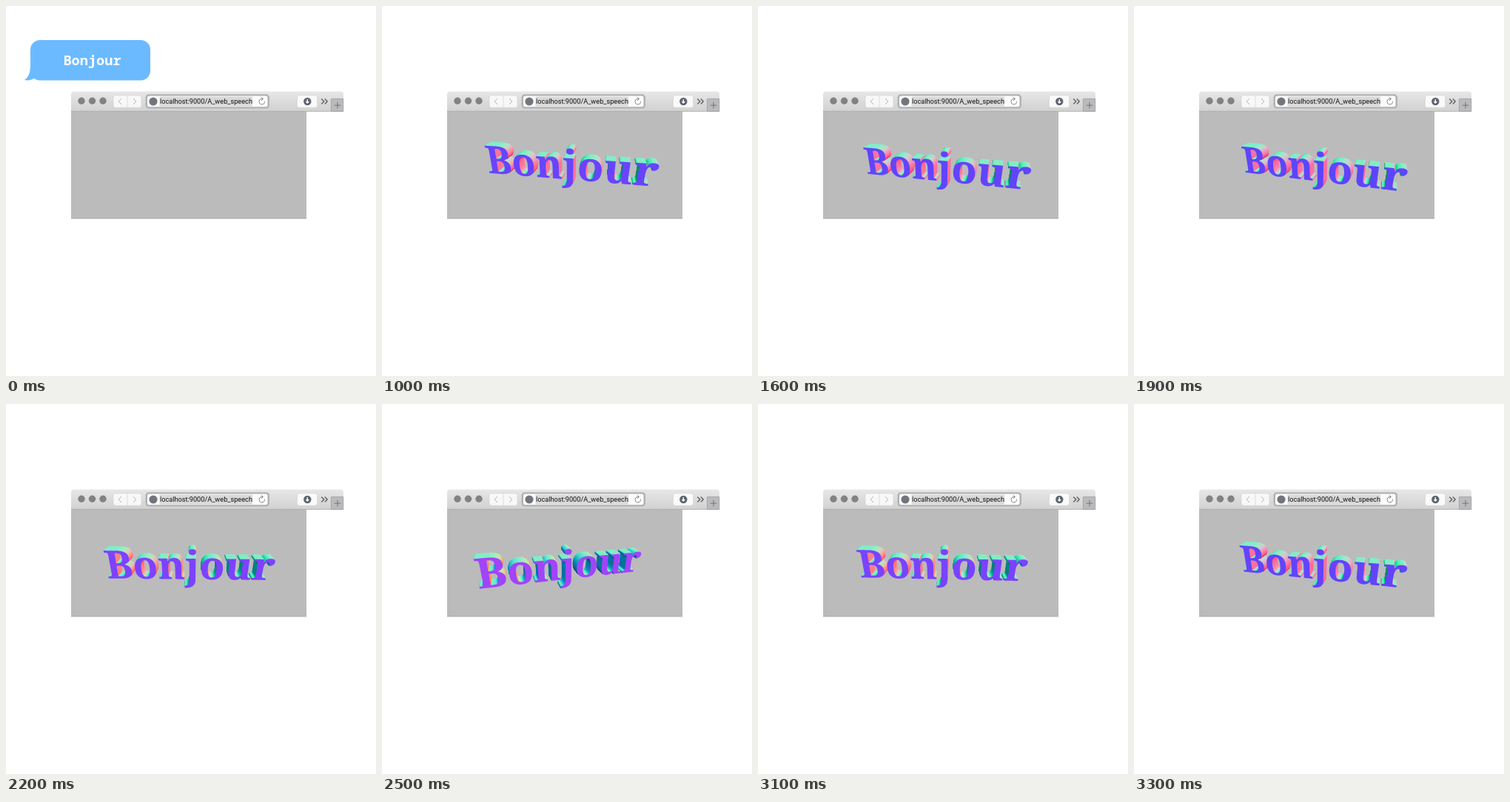
Write an HTML page with a canvas that moves like this. It is 500 px wide and 500 px high and loops after 3400 ms.

```html
<!DOCTYPE html>
<html lang="fr">
<head>
<meta charset="utf-8">
<title>Bonjour</title>
<style>
html, body { margin: 0; width: 100%; height: 100%; overflow: hidden; background: #fff; }
canvas { display: block; width: 500px; height: 500px; }
</style>
</head>
<body>
<canvas id="stage"></canvas>
<script>
const LOOP = 3400, STEP = 100, SPEAK = 1000;
const canvas = document.getElementById('stage');
const ctx = canvas.getContext('2d');
const dpr = window.devicePixelRatio || 1;
canvas.width = canvas.height = 500 * dpr;

// --- 2D helpers ---
function box(x, y, w, h, r, fill, line) {
  ctx.beginPath();
  ctx.roundRect(x, y, w, h, r);
  if (fill) { ctx.fillStyle = fill; ctx.fill(); }
  if (line) { ctx.strokeStyle = line; ctx.stroke(); }
}

function disc(x, y, r, fill) {
  ctx.beginPath();
  ctx.arc(x, y, r, 0, Math.PI * 2);
  ctx.fillStyle = fill;
  ctx.fill();
}

function line(color, width, ...pts) {
  ctx.beginPath();
  for (let i = 0; i < pts.length; i += 2) ctx.lineTo(pts[i], pts[i + 1]);
  ctx.strokeStyle = color;
  ctx.lineWidth = width;
  ctx.stroke();
}

function drawBubble() {
  const blue = '#6bbaff';
  box(33, 46, 162, 54.5, 13, blue);
  ctx.beginPath();
  ctx.moveTo(33, 72);
  ctx.bezierCurveTo(33.5, 88, 32, 95, 25, 100);
  ctx.bezierCurveTo(30, 101, 35, 100, 39, 97);
  ctx.lineTo(48, 90);
  ctx.lineTo(48, 72);
  ctx.fill();
  ctx.fillStyle = '#fff';
  ctx.font = 'bold 18.6px "Noto Sans Mono", monospace';
  ctx.textAlign = 'center';
  ctx.fillText('Bonjour', 116.5, 79.5);
  ctx.textAlign = 'left';
}

function drawBrowser() {
  box(88, 142, 318, 145, 0, '#bbbbbb');
  line('#a2a2a2', 1, 88, 287, 406, 287);

  const bar = ctx.createLinearGradient(0, 116, 0, 142);
  bar.addColorStop(0, '#e6e6e6');
  bar.addColorStop(1, '#d2d2d2');
  box(88, 115.5, 368, 26.5, [4, 4, 0, 0], bar);
  line('#b0b0b0', 1, 88, 142.3, 456, 142.3);

  for (const x of [102, 116.5, 131]) disc(x, 128.3, 4.7, '#828282');

  // navigation
  ctx.lineWidth = 0.6;
  box(145, 120.8, 38, 16.4, 3, '#f8f8f8', '#cfcfcf');
  line('#d4d4d4', 0.8, 164, 121, 164, 137);
  line('#b2b2b2', 1, 156, 125, 152.2, 129, 156, 133);
  line('#b2b2b2', 1, 172, 125, 175.8, 129, 172, 133);

  // address field
  box(188.5, 119.3, 167.5, 19.2, 4.5, '#b2b2b2');
  box(191, 121.6, 162.5, 14.6, 2.5, '#fcfcfc');
  disc(199, 129, 5.6, '#71767c');
  box(207.5, 122.5, 125.5, 13, 0, '#d9d9d9');
  ctx.fillStyle = '#111';
  ctx.font = '9.2px Roboto, sans-serif';
  ctx.fillText('localhost:9000/A_web_speech', 208, 132.3);
  ctx.beginPath();
  ctx.arc(345.8, 129.2, 3.7, -0.1, 5);
  ctx.strokeStyle = '#777';
  ctx.lineWidth = 0.9;
  ctx.stroke();
  line('#777', 0.9, 345, 123.4, 347.5, 125.6, 345, 127.8);

  // downloads, overflow and new tab
  ctx.lineWidth = 0.6;
  box(393.3, 120.8, 27.4, 16.4, 3, '#fafafa', '#cfcfcf');
  disc(407.3, 129, 5.2, '#5c6470');
  line('#fff', 1.4, 407.3, 126, 407.3, 130);
  ctx.beginPath();
  ctx.moveTo(404.6, 129);
  ctx.lineTo(410, 129);
  ctx.lineTo(407.3, 132.2);
  ctx.fillStyle = '#fff';
  ctx.fill();
  for (const x of [426.3, 430.8]) line('#555', 1.2, x, 125.5, x + 3.5, 129, x, 132.5);
  ctx.lineWidth = 0.8;
  box(439.4, 125.4, 16.4, 17, 0, '#bababd', '#a0a0a2');
  line('#6c6c6c', 0.9, 443.8, 134.2, 452.2, 134.2);
  line('#6c6c6c', 0.9, 448, 130, 448, 138.4);
}

// --- letter outlines, traced from rendered text; y points up from the baseline ---
function traceText(text, halfWidth) {
  const w = 640, h = 190, base = 130;
  const off = document.createElement('canvas');
  off.width = w;
  off.height = h;
  const g = off.getContext('2d', { willReadFrequently: true });
  g.font = 'bold 120px "Noto Serif", serif';
  g.fillText(text, 20, base);
  const data = g.getImageData(0, 0, w, h).data;
  const alpha = (x, y) => data[(y * w + x) * 4 + 3];
  const next = new Map(), pts = new Map();
  const corners = [[0, 0], [1, 0], [1, 1], [0, 1]];
  let minX = w, maxX = 0;

  for (let y = 0; y < h - 1; y++) for (let x = 0; x < w - 1; x++) {
    const cuts = [];
    for (let i = 0; i < 4; i++) {
      const [ax, ay] = corners[i], [bx, by] = corners[(i + 1) % 4];
      const a = alpha(x + ax, y + ay), b = alpha(x + bx, y + by);
      if (a > 127 === b > 127) continue;
      const u = (127.5 - a) / (b - a);
      const px = x + ax + (bx - ax) * u, py = y + ay + (by - ay) * u;
      const key = 2 * ((y + Math.min(ay, by)) * w + x + Math.min(ax, bx)) + (ax === bx ? 1 : 0);
      pts.set(key, [px, py]);
      minX = Math.min(minX, px);
      maxX = Math.max(maxX, px);
      cuts.push({ key, exit: a > 127 });
    }
    cuts.forEach((c, i) => {
      if (c.exit) next.set(c.key, cuts[(i + 1) % cuts.length].key);
    });
  }

  const k = 2 * halfWidth / (maxX - minX), mid = (minX + maxX) / 2;
  const loops = [];
  while (next.size) {
    const loop = [];
    let key = next.keys().next().value;
    while (next.has(key)) {
      const [x, y] = pts.get(key), to = next.get(key);
      loop.push({ x: (x - mid) * k, y: (base - y) * k });
      next.delete(key);
      key = to;
    }
    const n = loop.length;
    loop.forEach((p, i) => {
      const a = loop[(i + n - 1) % n], b = loop[(i + 2) % n];
      const dx = b.x - a.x, dy = b.y - a.y, len = Math.hypot(dx, dy) || 1;
      p.nx = -dy / len;
      p.ny = dx / len;
    });
    loops.push(loop);
  }
  return loops;
}

// --- extruded word, coloured by its surface normals ---
const FOCAL = 300, DEPTH = 18, LIFT = 22;
const TILT = 29 * Math.PI / 180, ST = Math.sin(TILT), CT = Math.cos(TILT);
const GAIN = [127, 127, 146];
const word = traceText('Bonjour', 110);

function turn(x, y, z, s, c) {
  const zr = z * c - x * s;
  return [x * c + z * s, y * CT - zr * ST, y * ST + zr * CT];
}

function shade(n) {
  return 'rgb(' + n.map((v, i) => Math.round(Math.max(0, Math.min(255, 128 + GAIN[i] * v)))) + ')';
}

// a slow drift first, then a steady swing
function angleAt(t) {
  if (t < 1400) return -11 - (t - SPEAK) / 400;
  if (t < 1900) return -12 - 4.2 * (1 - Math.cos((t - 1400) / 500 * Math.PI)) / 2;
  return 17.2 * Math.sin((60 + (t - 2500) * 0.2165) * Math.PI / 180);
}

function drawWord(t) {
  const angle = angleAt(t) * Math.PI / 180;
  const s = Math.sin(angle), c = Math.cos(angle);
  const intro = Math.max(0, 1 - (t - SPEAK) / 500);
  const size = 1 + 0.03 * intro, cx = 248 + 2 * intro, cy = 259 - 2.5 * intro;

  const view = (p, z) => {
    const v = turn(p.x * size, p.y * size, z, s, c);
    return [v[0], v[1] + LIFT, v[2] - FOCAL];
  };
  const project = v => [cx - v[0] * FOCAL / v[2], cy + v[1] * FOCAL / v[2]];

  const sides = [], faces = [];
  for (const loop of word) {
    const front = loop.map(p => view(p, 0)), back = loop.map(p => view(p, -DEPTH));
    const f2 = front.map(project), b2 = back.map(project);
    faces.push(f2);
    loop.forEach((p, i) => {
      const n = turn(p.nx, p.ny, 0, s, c), v = front[i], j = (i + 1) % loop.length;
      if (n[0] * v[0] + n[1] * v[1] + n[2] * v[2] >= 0) return;
      const far = Math.hypot(v[0] + back[i][0], v[1] + back[i][1], v[2] + back[i][2]);
      sides.push({ far, color: shade(n), quad: [f2[i], f2[j], b2[j], b2[i]] });
    });
  }

  sides.sort((a, b) => b.far - a.far);
  ctx.lineWidth = 0.5;
  for (const { color, quad } of sides) {
    ctx.beginPath();
    for (const q of quad) ctx.lineTo(q[0], q[1]);
    ctx.closePath();
    ctx.fillStyle = ctx.strokeStyle = color;
    ctx.fill();
    ctx.stroke();
  }

  ctx.beginPath();
  for (const face of faces) {
    face.forEach((q, i) => i ? ctx.lineTo(q[0], q[1]) : ctx.moveTo(q[0], q[1]));
    ctx.closePath();
  }
  ctx.fillStyle = shade(turn(0, 0, 1, s, c));
  ctx.fill('evenodd');
}

function draw(t) {
  ctx.setTransform(dpr, 0, 0, dpr, 0, 0);
  ctx.fillStyle = '#fff';
  ctx.fillRect(0, 0, 500, 500);
  drawBrowser();
  if (t < SPEAK) drawBubble();
  else drawWord(t);
}

const start = performance.now();
let shown = -1;
function tick() {
  const t = (performance.now() - start) % LOOP;
  const step = t < SPEAK ? 0 : Math.floor(t / STEP) * STEP;
  if (step !== shown) draw(shown = step);
  requestAnimationFrame(tick);
}
tick();
</script>
</body>
</html>
```
